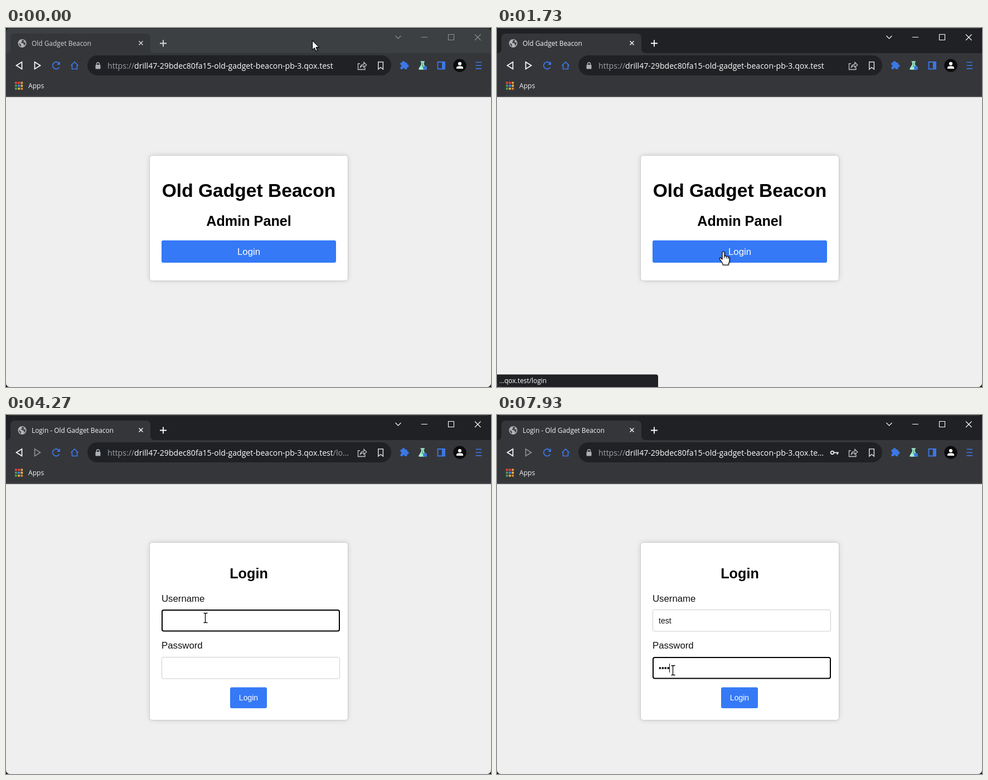
These frames come from a looping animation (870 px wide and 644 px high, 8 s). An HTML page with a canvas:

```html
<!DOCTYPE html>
<html lang="en">
<head>
<meta charset="utf-8">
<title>Login demo</title>
<style>
html, body { margin: 0; width: 100%; height: 100%; overflow: hidden; background: #18191b; }
canvas { display: block; }
</style>
</head>
<body>
<canvas id="stage" width="870" height="644"></canvas>
<script>
const ctx = document.getElementById('stage').getContext('2d');
const LOOP = 8000, STEP = 200 / 3;
const UI = '"Open Sans", "Noto Sans", sans-serif';
const PAGE = '"Liberation Sans", Arial, sans-serif';
const BLUE = '#3579f6', ICON_BLUE = '#3b78e7', BAR = '#35363a', DARK = '#202124', GREY = '#9aa0a6';
const BRAND = 'Old Gadget Beacon';
const HOST = 'drill47-29bdec80fa15-old-gadget-beacon-pb-3.qox.test';

// Moments of the story, in ms
const ACTIVE = 1670, CLICK = 1930, COMMIT = 2470, PAINT = 2530, TITLE = 2600, LOADED = 2730;
const FOCUS_USER = 3730, FOCUS_PASS = 6600;
const USER_KEYS = [4800, 4930, 5070, 5200];
const PASS_KEYS = [7670, 7730, 7870, 7930];
// time, x, y of the pointer
const MOVES = [
  [530, 549, 22], [1200, 410, 391], [1400, 406, 399], [1470, 404, 401],
  [3130, 404, 401], [3200, 390, 388], [3270, 370, 369], [3330, 363, 366],
  [3400, 359, 364], [3470, 357, 364], [5670, 357, 364], [6270, 315, 458]
];

function box(x, y, w, h, r, fill, stroke, lw = 1) {
  ctx.beginPath();
  ctx.roundRect(x, y, w, h, r);
  if (fill) { ctx.fillStyle = fill; ctx.fill(); }
  if (stroke) { ctx.strokeStyle = stroke; ctx.lineWidth = lw; ctx.stroke(); }
}

function disc(x, y, r, fill) {
  ctx.fillStyle = fill;
  ctx.beginPath();
  ctx.arc(x, y, r, 0, 7);
  ctx.fill();
}

function shape(d, stroke, lw, fill, x = 0, y = 0) {
  const p = new Path2D(d);
  ctx.save();
  ctx.translate(x, y);
  if (fill) { ctx.fillStyle = fill; ctx.fill(p); }
  if (stroke) { ctx.strokeStyle = stroke; ctx.lineWidth = lw; ctx.stroke(p); }
  ctx.restore();
}

function arc(x, y, r, from, to, color, lw) {
  ctx.strokeStyle = color;
  ctx.lineWidth = lw;
  ctx.beginPath();
  ctx.arc(x, y, r, from, to);
  ctx.stroke();
}

// Returns the x where the text ends
function text(s, x, y, font, color, align = 'left') {
  ctx.font = font;
  ctx.fillStyle = color;
  ctx.textAlign = align;
  ctx.fillText(s, x, y);
  return x + ctx.measureText(s).width;
}

const count = (keys, t) => keys.filter(k => t >= k).length;

function pointer(t) {
  let a = MOVES[0];
  for (const b of MOVES) {
    if (t < b[0]) {
      if (t <= a[0]) break;
      const u = (t - a[0]) / (b[0] - a[0]);
      const e = u * u * (3 - 2 * u);
      return [a[1] + (b[1] - a[1]) * e, a[2] + (b[2] - a[2]) * e];
    }
    a = b;
  }
  return [a[1], a[2]];
}

function globe(x, y, r) {
  disc(x, y, r, '#b4b7ba');
  ctx.save();
  ctx.translate(x, y);
  ctx.scale(r / 7.5, r / 7.5);
  shape('M-5.8-1L-2 2.2-2 6Q-6 4-5.8-1zM-1.5-6Q1-4.5-1-3.2L-2.4-1.2 2 0.2 3.6 3.2 2 5.4Q6.8 3 5.8-2.2L3.6-1.6 2.6-4 4-5Q1.5-6.6-1.5-6z', null, 0, '#45474b');
  ctx.restore();
}

function tab(t) {
  const active = t >= ACTIVE, ink = active ? '#f1f3f4' : '#d0d2d5';
  shape('M0 45Q8 45 8 37V18Q8 10 16 10H251Q259 10 259 18V37Q259 45 267 45z', null, 0, BAR);
  if (t >= CLICK && t < LOADED) {
    globe(29, 27.5, 4.6);
    const committed = t >= COMMIT;
    const turn = (t - CLICK) / 1000 * 2 * Math.PI * (committed ? 1 : -0.6);
    arc(29, 27.5, 7.3, turn, turn + 1.6, committed ? '#45608f' : '#74777b', 1.4);
  } else {
    globe(29, 27.5, 7.5);
  }
  const title = t < COMMIT ? BRAND : t < TITLE ? HOST : 'Login - ' + BRAND;
  const fade = ctx.createLinearGradient(205, 0, 226, 0);
  fade.addColorStop(0, ink);
  fade.addColorStop(1, BAR);
  ctx.save();
  ctx.beginPath();
  ctx.rect(46, 12, 180, 30);
  ctx.clip();
  text(title, 46, 32, '11.9px ' + UI, fade);
  ctx.restore();
  shape('M238.5 23.5l7 7m0-7l-7 7', ink, 1.5);
  shape('M276 27.5h12m-6-6v12', active ? '#fff' : '#dadce0', 1.8);
}

function windowButtons(color) {
  shape('M698.5 14l5 5 5-5M745 16.5h11M793.5 11.5h10v10h-10zM841 11.5l10.5 10.5m0-10.5l-10.5 10.5', color, 1.1);
}

function toolbar(t) {
  const busy = t >= CLICK && t < LOADED, login = t >= COMMIT, key = t >= PASS_KEYS[0];
  shape('M28.5 61v12.5L18.5 67.2z', '#fff', 1.7);
  shape('M51.5 61v12.5L61.5 67.2z', login ? '#8b8d91' : '#fff', 1.7);
  if (busy) {
    shape('M84 61.5l11.5 11.5m0-11.5l-11.5 11.5', '#d33b30', 1.7);
  } else {
    arc(90, 67.3, 6.3, 0.5, 5.5, ICON_BLUE, 1.8);
    shape('M97 60v6h-6z', null, 0, ICON_BLUE);
  }
  shape('M116.5 67.5l6.5-6.5 6.5 6.5M118.5 66v7.5h9V66', ICON_BLUE, 1.7);

  box(146, 49, 545, 36, 18, DARK);
  box(160.5, 66, 9, 7.5, 1, '#aeb2b6');
  shape('M162.5 66.5v-2a2.5 2.5 0 0 1 5 0v2', '#aeb2b6', 1.4);
  const font = '14.1px ' + UI;
  let x = text('https://', 182, 73, font, GREY);
  x = text(key ? HOST.slice(0, -2) + '…' : HOST, x, 73, font, '#fff');
  if (login && !key) text('/lo…', x, 73, font, GREY);
  if (key) {
    arc(601.5, 67.5, 2.8, 0, 7, '#dadce0', 2);
    shape('M604.5 67.5h8.5M610.5 67.5v3.5', '#dadce0', 2.2);
  }
  shape('M635 64h-3.500v10.500h12.500V71M635.500 70.500q1-5.500 6.500-5.700v-3.300l4.700 4.800-4.700 4.700v-3.200q-4-.1-6.500 2.700z', '#c4c7ca', 1.3);
  shape('M667.800 61h8.600v13l-4.300-3.400-4.300 3.400z', '#dadce0', 1.5);

  box(707.5, 62, 12, 12, 1.2, ICON_BLUE);
  disc(713, 61.8, 2.6, ICON_BLUE);
  disc(719.8, 67.8, 2.6, ICON_BLUE);
  disc(707.4, 68, 2, BAR);
  disc(713.3, 74, 2, BAR);

  shape('M743.500 59.500h7.500v1.600h-1.200v4.400l4.500 7.500q.6 1.700-1 1.700h-12q-1.600 0-1-1.700l4.500-7.500v-4.400h-1.300z', null, 0, '#a5f0cf');
  shape('M746.600 61.500h1.600v5l1.500 3h-4.600l1.500-3z', null, 0, '#4fae8a');
  disc(751.5, 71.5, 3.6, ICON_BLUE);
  shape('M774.500 61h12.500v12.500h-12.500z', ICON_BLUE, 1.8);
  shape('M782 61h5.500v12.500h-5.500z', null, 0, ICON_BLUE);
  disc(814, 67.3, 11.7, '#0b0b0c');
  disc(814, 64, 3.1, '#fff');
  shape('M808 73v-1.500q0-3.200 6-3.200t6 3.200V73z', null, 0, '#fff');
  shape('M842.500 61.500h10.500m-10.500 5.700h10.500m-10.500 5.700h10.500', ICON_BLUE, 1.6);

  const dots = ['#e8453c', '#e8453c', '#f0a03c', '#4a9e5a', '#4285f4', '#f3b73e', '#4a9e5a', '#e6b13a', '#e0852f'];
  dots.forEach((c, i) => box(16 + i % 3 * 5.2, 96.5 + Math.floor(i / 3) * 5.2, 3.8, 3.8, 0.6, c));
  text('Apps', 40, 108, '12.1px ' + UI, '#f1f3f4');
}

function card(h) {
  ctx.save();
  ctx.shadowColor = 'rgba(0,0,0,.14)';
  ctx.shadowBlur = 10;
  box(257.5, 228.5, 356, h, 5, '#fff');
  ctx.restore();
  box(257.5, 228.5, 356, h, 5, null, '#cbcbcb');
}

function home() {
  card(225);
  text(BRAND, 435.5, 303, 'bold 33.6px ' + PAGE, '#000', 'center');
  text('Admin Panel', 435.5, 355, 'bold 25.2px ' + PAGE, '#000', 'center');
  box(279, 381, 313, 40, 3, BLUE);
  text('Login', 435.5, 407, '16.8px ' + PAGE, '#fff', 'center');
}

function field(y, value, focused, caret) {
  if (focused) box(280, y + 1, 318, 37.5, 3, '#fff', '#000', 2);
  else box(279.5, y + 0.5, 319, 38.5, 3, '#fff', '#ccc');
  const end = text(value, 290, y + 25, '14px ' + PAGE, '#111');
  if (caret) {
    ctx.fillStyle = '#000';
    ctx.fillRect(Math.floor(end), y + 12, 1, 16);
  }
}

// The caret restarts its blink on focus and on every key
function caretOn(t, focus, keys) {
  const last = [focus, ...keys].filter(k => t >= k).pop();
  return t >= focus && Math.floor((t - last + 10) / 535) % 2 === 0;
}

function loginForm(t) {
  const inPass = t >= FOCUS_PASS, inUser = t >= FOCUS_USER && !inPass;
  card(319);
  text('Login', 435.5, 293, 'bold 25.2px ' + PAGE, '#000', 'center');
  text('Username', 279, 335, '16.8px ' + PAGE, '#111');
  field(349, 'test'.slice(0, count(USER_KEYS, t)), inUser, inUser && caretOn(t, FOCUS_USER, USER_KEYS));
  text('Password', 279, 419, '16.8px ' + PAGE, '#111');
  field(434, '•'.repeat(count(PASS_KEYS, t)), inPass, inPass && caretOn(t, FOCUS_PASS, PASS_KEYS));
  box(402, 488.5, 66, 37.5, 3, BLUE);
  text('Login', 435, 512, '14px ' + PAGE, '#fff', 'center');
}

function status(t) {
  if (t < ACTIVE || t >= 3000) return;
  ctx.save();
  ctx.globalAlpha = t < 1730 ? 0.5 : t < 2870 ? 1 : t < 2930 ? 0.66 : 0.33;
  box(0, 621.5, 289, 24, [0, 4, 0, 0], DARK);
  const msg = t < CLICK ? '…qox.test/login' : 'Waiting for ' + HOST.slice(0, 33) + '…';
  if (t >= CLICK) shape('M1.500 622v22M287 623v21', '#45474b', 2);
  text(msg, 4, 637, '11.9px ' + UI, '#fff');
  ctx.restore();
}

function cursorKind(t, x, y) {
  const within = (l, top, r, b) => x >= l && x <= r && y >= top && y <= b;
  if (t < PAINT) {
    if (within(279, 381, 592, 421)) return 'hand';
    return within(282, 272, 589, 310) || within(360, 332, 511, 361) ? 'beam' : 'arrow';
  }
  return within(279, 349, 599, 387) || within(279, 404, 352, 423) || within(279, 434, 599, 474) ? 'beam' : 'arrow';
}

function cursor(t) {
  const [x, y] = pointer(t).map(Math.round);
  const kind = cursorKind(t, x, y);
  if (kind === 'beam') {
    shape('M-3-8.500h2.500q.5 0 .5 1V7.500q0 1-.5 1h-2.500M4-8.500h-2.500q-.5 0-1 1M4 8.500h-2.500q-.5 0-1-1', '#000', 1.3, null, x + 0.5, y);
    return;
  }
  ctx.save();
  ctx.lineJoin = 'round';
  ctx.shadowColor = 'rgba(0,0,0,.3)';
  ctx.shadowBlur = 2;
  ctx.shadowOffsetX = ctx.shadowOffsetY = 1;
  if (kind === 'hand') {
    shape('M-2 14V2a2 2 0 0 1 4 0v6q3-1 3.600.8 2.600-.8 3.200 1 2.200-.5 2.200 1.800v5q0 3-2 5.400v2H-1v-2L-6.500 13.500q-.8-2 .8-2.400 1.600-.2 3.700 2.900z', '#000', 1.1, '#fff', x + 2, y);
    ctx.shadowColor = 'transparent';
    shape('M2 8v4M5.600 9v3.500M8.800 10v3', '#000', 1, null, x + 2, y);
  } else {
    shape('M0 0V16.500L3.800 13 6.300 18.800 8.900 17.700 6.500 12H11.700z', '#000', 1, '#fff', x + 0.5, y + 0.5);
  }
  ctx.restore();
}

function draw(t) {
  const active = t >= ACTIVE;
  ctx.fillStyle = '#18191b';
  ctx.fillRect(0, 0, 870, 644);
  ctx.save();
  ctx.beginPath();
  ctx.roundRect(0, 0, 870, 644, 7);
  ctx.clip();
  ctx.fillStyle = active ? DARK : '#3c4043';
  ctx.fillRect(0, 0, 870, 45);
  ctx.fillStyle = active ? '#3a3b3d' : '#2b2d30';
  ctx.fillRect(0, 0, 870, 1);
  ctx.fillStyle = BAR;
  ctx.fillRect(0, 45, 870, 78);
  ctx.fillStyle = '#505154';
  ctx.fillRect(0, 122, 870, 2);
  ctx.fillStyle = '#efefef';
  ctx.fillRect(0, 124, 870, 520);
  tab(t);
  windowButtons(active ? '#fff' : '#8d9093');
  toolbar(t);
  if (t < PAINT) home();
  else loginForm(t);
  status(t);
  ctx.restore();
  cursor(t);
}

function tick(now) {
  const k = Math.floor((now % LOOP + 5) / STEP) % (LOOP / STEP);
  draw(Math.round(k * STEP / 10) * 10);
  requestAnimationFrame(tick);
}
requestAnimationFrame(tick);
</script>
</body>
</html>
```
